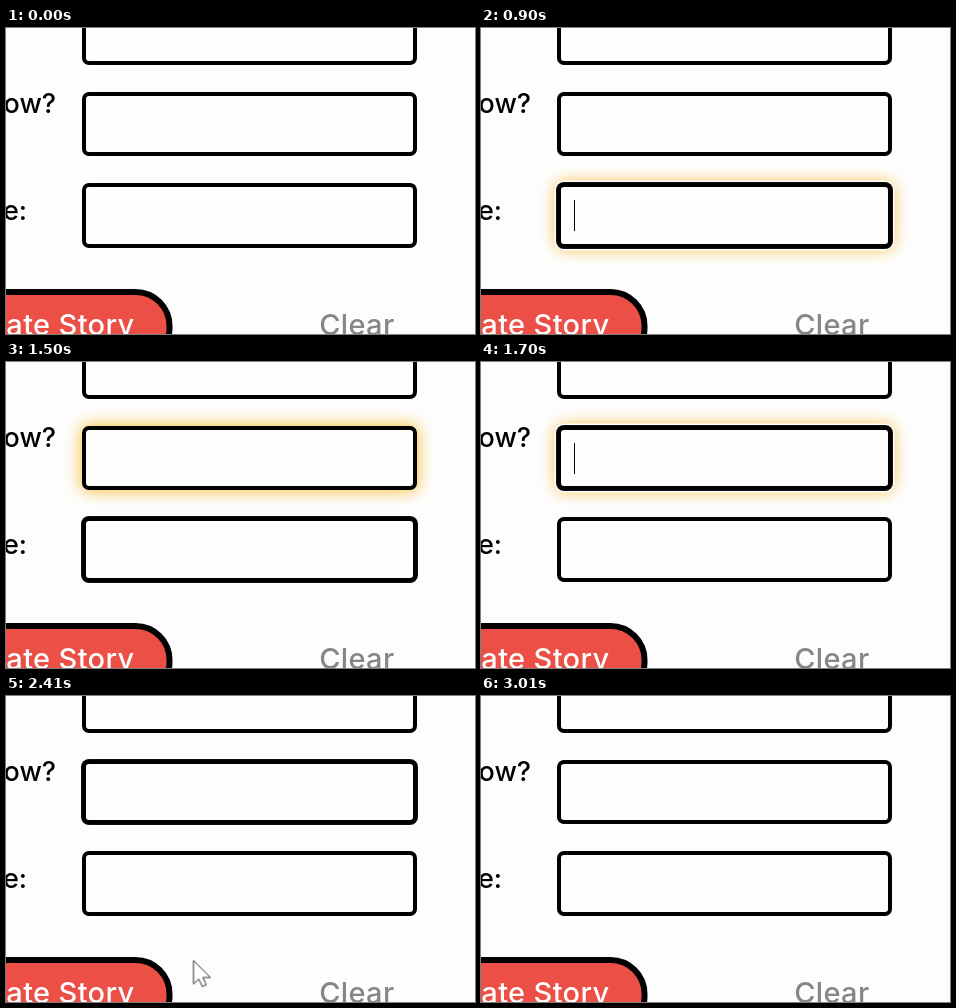
An HTML page that plays this animation: 469x306 px, repeating every 3320 ms.

```html
<!DOCTYPE html>
<html lang="en">
<head>
<meta charset="utf-8">
<title>Story form</title>
<style>
html, body { margin: 0; width: 100%; height: 100%; overflow: hidden; background: #fdfdfd; }
.stage {
  --loop: 3320ms step-end infinite;
  --ring: 0 0 0 1px #101010, 0 0 0 2.5px #fff;
  --glow: 0 0 16px 1px #f8bd35;
  position: relative; width: 469px; height: 306px; overflow: hidden;
}
.field {
  position: absolute; left: 76px; width: 335px; height: 65px; box-sizing: border-box;
  border: 4px solid #000; border-radius: 7px; background: #fefefe;
}
.first { top: -28px; }
.second { top: 64px; height: 64px; animation: second var(--loop); }
.third { top: 155px; animation: third var(--loop); }
.caret { position: absolute; left: 13px; top: 13px; width: 1px; height: 31px; background: #000; opacity: 0; }
.second .caret { animation: caret2 var(--loop); }
.third .caret { animation: caret3 var(--loop); }
svg { position: absolute; left: 0; top: 0; }
text { font: 500 27px Montserrat, Inter, sans-serif; }
text.action { font-size: 29px; letter-spacing: .35px; }
.arrow { opacity: 0; animation: arrow var(--loop); }

@keyframes second {
  0% { box-shadow: none; }
  42.16% { box-shadow: var(--glow); }
  51.2% { box-shadow: var(--ring), var(--glow); }
  60.54% { box-shadow: var(--ring); }
  84.63%, 100% { box-shadow: none; }
}
@keyframes third {
  0% { box-shadow: none; }
  24.09% { box-shadow: var(--glow); }
  27.1% { box-shadow: var(--ring), var(--glow); }
  39.15% { box-shadow: var(--ring); }
  51.2% { box-shadow: none; }
  60.54% { box-shadow: var(--glow); }
  69.57%, 100% { box-shadow: none; }
}
@keyframes caret2 {
  0% { opacity: 0; }
  51.2% { opacity: 1; }
  66.86%, 100% { opacity: 0; }
}
@keyframes caret3 {
  0% { opacity: 0; }
  27.1% { opacity: 1; }
  42.16%, 100% { opacity: 0; }
}
@keyframes arrow {
  0% { opacity: 0; transform: translate(186px, 294px); }
  18.07% { opacity: 1; transform: translate(186px, 294px); }
  21.08% { opacity: 1; transform: translate(188px, 258px); }
  24.09% { opacity: 0; transform: translate(190px, 200px); }
  39.15% { opacity: 1; transform: translate(191.5px, 140.5px); }
  42.16% { opacity: 0; transform: translate(192px, 110px); }
  69.57% { opacity: 1; transform: translate(189px, 236px); }
  72.58% { opacity: 1; transform: translate(187.5px, 264.5px); }
  75.6% { opacity: 1; transform: translate(188px, 271px); }
  78.61% { opacity: 1; transform: translate(188px, 274px); }
  81.62% { opacity: 1; transform: translate(187px, 277px); }
  87.65% { opacity: 1; transform: translate(185px, 294px); }
  90.66%, 100% { opacity: 0; transform: translate(185px, 310px); }
}
</style>
</head>
<body>
<div class="stage">
  <div class="field first"></div>
  <div class="field second"><div class="caret"></div></div>
  <div class="field third"><div class="caret"></div></div>
  <svg width="469" height="306" viewBox="0 0 469 306">
    <text x="50" y="85" text-anchor="end">ow?</text>
    <text x="21" y="192" text-anchor="end">e:</text>
    <rect x="-120" y="264" width="283.5" height="70" rx="34" fill="#eb4f46" stroke="#000" stroke-width="6"/>
    <text class="action" x="128.5" y="307" text-anchor="end" fill="#fff">ate Story</text>
    <text class="action" x="388.5" y="307" text-anchor="end" fill="#868686">Clear</text>
    <path class="arrow" d="M0 0V23.5L5.3 18.6L8.8 26L12.8 24.3L9.4 17H17Z" fill="#fff" stroke="#333" stroke-width="1"/>
  </svg>
</div>
</body>
</html>
```
